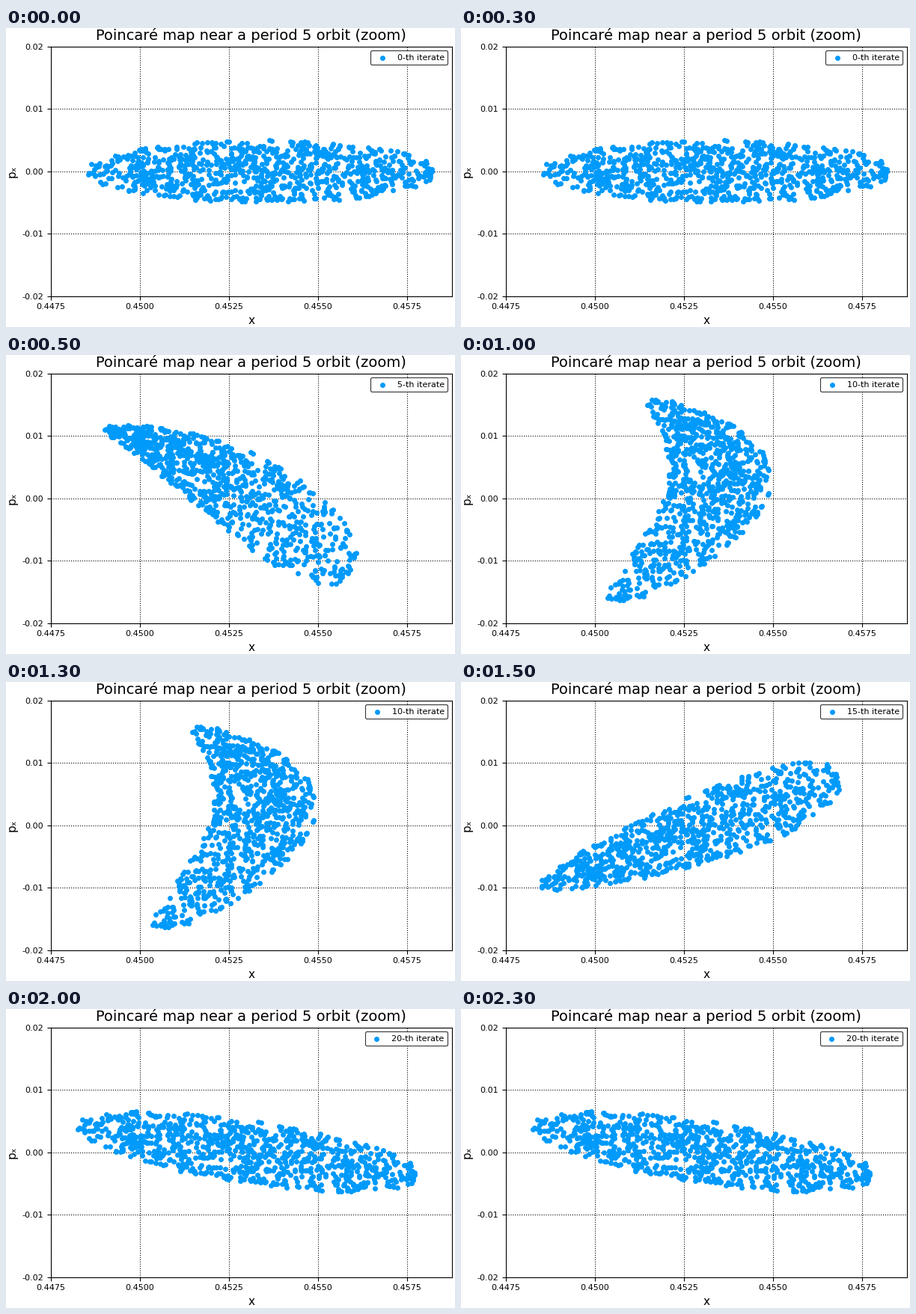
Write a matplotlib script that moves like this. It is 600 by 400 pixels and loops after 2.5 s.

```python
import numpy as np
import matplotlib.pyplot as plt
from matplotlib.animation import FuncAnimation

plt.rcParams["font.family"] = "DejaVu Sans"

W, H, DPI = 600, 400, 100
LEFT, RIGHT, TOP, BOTTOM = 59.7, 595.7, 24.7, 358.7
XLIM, YLIM = (0.4475, 0.45875), (-0.02, 0.02)
BLUE = "#009AFA"
COUNT = 920

# One cloud of orbit points, spread evenly over the unit disc
rng = np.random.default_rng(5)
radius = np.sqrt(rng.random(COUNT))
angle = rng.uniform(0, 2 * np.pi, COUNT)
u, v = radius * np.cos(angle), radius * np.sin(angle)


def cloud(centre, along, across, bend=(0, 0), flare=(0, 0)):
    """Quadratic map of the disc: stretched, bent and widened, in pixels."""
    terms = zip((1, u, v, u * u, u * v), (centre, along, across, bend, flare))
    px, py = sum(np.multiply.outer(k, np.ones(COUNT)) * t
                 for t, k in terms)
    return np.column_stack([np.interp(px, (LEFT, RIGHT), XLIM),
                            np.interp(py, (TOP, BOTTOM), YLIM[::-1])])


# The cloud after every fifth iterate
clouds = [
    cloud((342, 192), (234, 0), (0, -42)),
    cloud((290, 167), (165, 99), (30, -40), (7, 30), (22, -22)),
    cloud((343, 177), (-28, 137), (70, 2), (-110, 19)),
    cloud((309, 201), (201.5, -74), (-16, -42.5), (-2.5, -2), (-4, -16)),
    cloud((324, 191.5), (229, 33), (4, -42), (0, -2)),
]

fig = plt.figure(figsize=(W / DPI, H / DPI), dpi=DPI, facecolor="white")
ax = fig.add_axes([LEFT / W, 1 - BOTTOM / H,
                   (RIGHT - LEFT) / W, (BOTTOM - TOP) / H])
ax.set(xlim=XLIM, ylim=YLIM)
xticks = np.arange(5) * 0.0025 + 0.4475
yticks = np.arange(-2, 3) / 100
ax.set_xticks(xticks, [f"{x:.4f}" for x in xticks], fontsize=8)
ax.set_yticks(yticks, [f"{y:.2f}" for y in yticks], fontsize=8)
ax.grid(True, color="black", linestyle=":", linewidth=0.8)
ax.set_axisbelow(True)
ax.set_title("Poincaré map near a period 5 orbit (zoom)", fontsize=14)
ax.set_xlabel("x", fontsize=11)
ax.set_ylabel("pₓ", fontsize=11)

dots = ax.scatter(*clouds[0].T, s=16, c=BLUE, edgecolors=BLUE, linewidths=1,
                  label="0-th iterate")
legend = ax.legend(loc="upper right", fontsize=8, scatterpoints=1,
                   scatteryoffsets=[0.375], framealpha=0.8, edgecolor="black")
legend.get_frame().set_linewidth(0.8)


def draw(i):
    dots.set_offsets(clouds[i])
    legend.get_texts()[0].set_text(f"{5 * i}-th iterate")
    return dots, legend


anim = FuncAnimation(fig, draw, frames=5, interval=500, repeat=True,
                     repeat_delay=0, init_func=lambda: draw(0))
plt.show()
```
